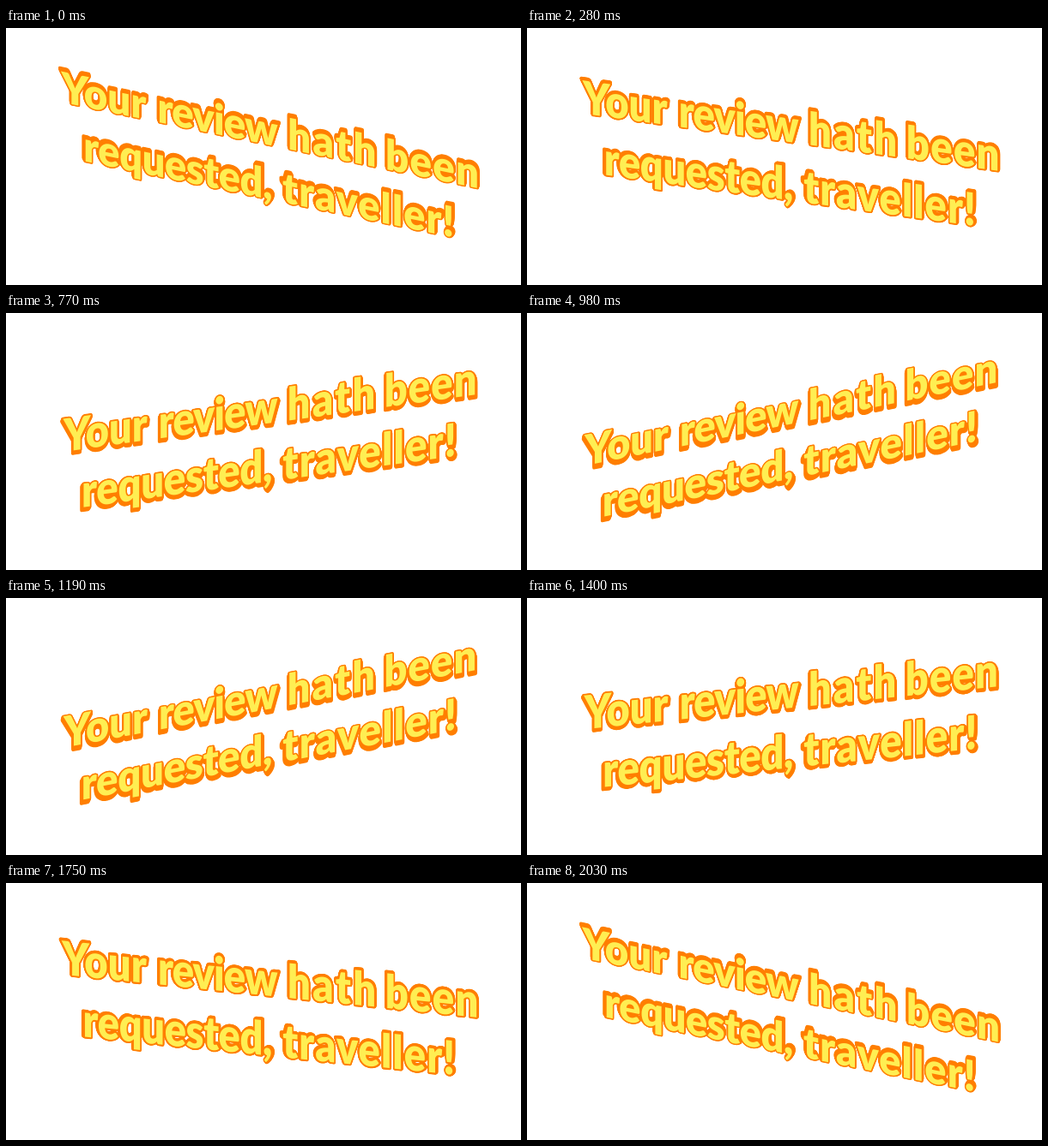
An HTML page for the animation above (2.1 s loop, 600 px wide and 300 px high).

```html
<!DOCTYPE html>
<html lang="en">
<head>
<meta charset="utf-8">
<title>Review requested</title>
<style>
  html, body { margin: 0; width: 100%; height: 100%; overflow: hidden; background: #fff; }
  svg { display: block; width: 600px; height: 300px; }
  text {
    font: 900 56px Lato, "Open Sans", sans-serif;
    text-anchor: middle;
    stroke: #ff7f00;
    stroke-linejoin: round;
    paint-order: stroke;
  }
  .side { fill: #ff7f00; stroke-width: 4.4; }
  .face { fill: #ffee52; stroke-width: 3; }
</style>
</head>
<body>
<svg id="stage" viewBox="0 0 600 300"></svg>
<script>
  const LOOP = 2100, STEP = 70;
  const CENTER = 300, LEADING = 36, CONDENSE = 0.84;
  const SLOPE = 0.207, DEPTH = 4, LAYERS = 7, FLARE = 0.022;

  // Text, middle x, line (-1 upper, 1 lower), letter spacing
  const words = [
    ["Your", 115, -1, 0],
    ["review", 246.5, -1, -1],
    ["hath", 380.5, -1, 2.8],
    ["been", 496, -1, 1.5],
    ["requested,", 199.5, 1, -0.4],
    ["traveller!", 423.5, 1, 1.4]
  ].map(([label, x, line, spacing]) => ({ label, x, line, spacing }));

  const stage = document.getElementById("stage");

  function add(parent, name, className) {
    const node = document.createElementNS("http://www.w3.org/2000/svg", name);
    if (className) node.setAttribute("class", className);
    return parent.appendChild(node);
  }

  for (const word of words) {
    word.group = add(stage, "g");
    word.layers = [];
    for (let i = LAYERS; i >= 0; i--) {
      const text = add(word.group, "text", i ? "side" : "face");
      text.textContent = word.label;
      text.style.letterSpacing = word.spacing + "px";
      if (i) text.setAttribute("aria-hidden", "true");
      word.layers.push({ text, depth: i / LAYERS });
    }
  }

  function draw(time) {
    const tilt = Math.cos(2 * Math.PI * time / LOOP);
    const height = 1 - 0.12 * tilt * tilt;
    const slope = SLOPE * tilt;
    const rise = 0.5 - DEPTH * tilt;

    for (const { x, line, group, layers } of words) {
      const zoom = 1 - line * 0.006 * tilt;
      const dx = (x - CENTER) * zoom;
      const y = 165 + 2 * tilt + line * LEADING * height + dx * slope;
      const wide = CONDENSE * zoom;
      group.setAttribute("transform",
        `matrix(${wide} ${wide * slope} 0 ${height} ${CENTER + dx} ${y})`);
      for (const { text, depth } of layers) {
        text.setAttribute("transform",
          `translate(0 ${rise * depth / height}) scale(${1 + FLARE * depth} 1)`);
      }
    }
  }

  const start = performance.now();
  function tick() {
    const elapsed = (performance.now() - start) % LOOP;
    draw(Math.floor(elapsed / STEP) * STEP);
    requestAnimationFrame(tick);
  }
  tick();
</script>
</body>
</html>
```
